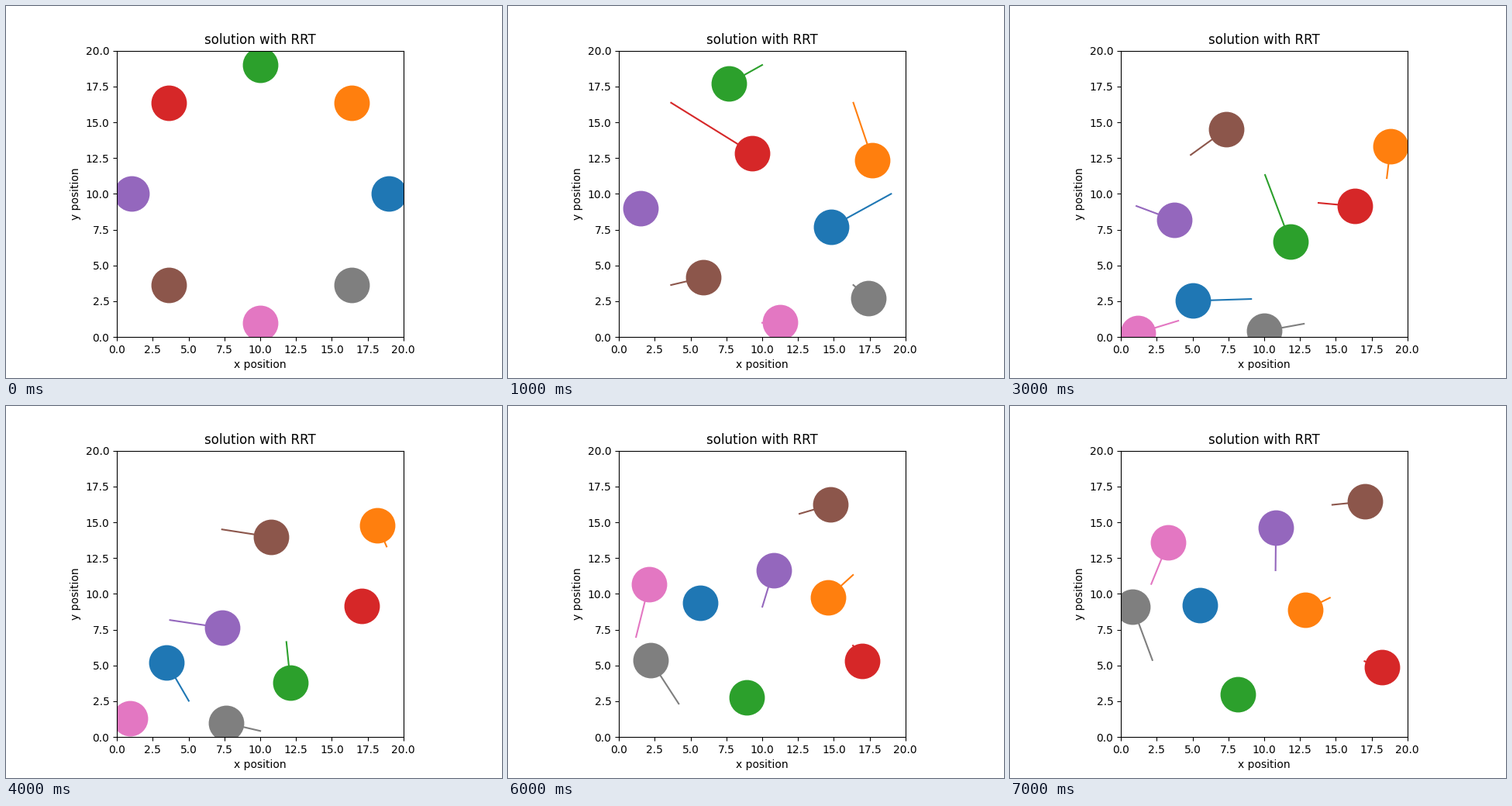
Recreate the animation shown at these times as a matplotlib script. Size 640 by 480 pixels, loop 8000 ms.

```python
import numpy as np
import matplotlib.pyplot as plt
from matplotlib.animation import FuncAnimation

SIZE = 20
ROBOTS = 8
STEPS = 8

# Steps at which the turning points are known; the rest lie on a smooth curve
KEY_STEPS = np.array([0, 1, 2, 4, 5, 7])
TURNS = [
    [(14.83, 7.71), (9.09, 2.66), (3.46, 5.20), (5.30, 8.55), (5.51, 9.20)],
    [(17.71, 12.37), (18.56, 11.10), (18.19, 14.78), (16.34, 11.32), (12.87, 8.88)],
    [(7.69, 17.71), (10.06, 11.32), (12.12, 3.79), (10.06, 2.87), (8.17, 2.97)],
    [(9.29, 12.86), (13.79, 9.37), (17.09, 9.15), (16.34, 6.39), (18.24, 4.87)],
    [(1.50, 9.00), (1.08, 9.15), (7.35, 7.63), (10.01, 9.10), (10.82, 14.62)],
    [(5.91, 4.17), (4.87, 12.72), (10.76, 13.97), (12.60, 15.59), (17.04, 16.45)],
    [(11.25, 1.02), (4.00, 1.14), (0.92, 1.30), (1.19, 6.99), (3.30, 13.59)],
    [(17.40, 2.74), (12.77, 0.93), (7.63, 0.98), (4.17, 2.33), (0.81, 9.10)],
]


def ring_start(i):
    """Robots start evenly spaced on a ring around the centre."""
    angle = 2 * np.pi * i / ROBOTS
    return SIZE / 2 + 9 * np.cos(angle), SIZE / 2 + 9 * np.sin(angle)


def hermite(keys, t):
    """Cubic Hermite curve through the keys, evaluated at step t."""
    slopes = np.gradient(keys, KEY_STEPS, axis=0)
    k = min(np.searchsorted(KEY_STEPS, t, side="right"), len(keys) - 1) - 1
    h = KEY_STEPS[k + 1] - KEY_STEPS[k]
    u = (t - KEY_STEPS[k]) / h
    blend = u * u * (3 - 2 * u)
    return (keys[k] * (1 - blend) + keys[k + 1] * blend
            + h * u * (1 - u) * ((1 - u) * slopes[k] - u * slopes[k + 1]))


def make_path(i):
    keys = np.array([ring_start(i)] + TURNS[i])
    return np.array([hermite(keys, t) for t in range(STEPS)])


paths = [make_path(i) for i in range(ROBOTS)]

fig, ax = plt.subplots(figsize=(6.4, 4.8), dpi=100)
ax.set_aspect("equal")
ax.set_xlim(0, SIZE)
ax.set_ylim(0, SIZE)
ticks = np.arange(0, SIZE + 0.1, 2.5)
ax.set_xticks(ticks)
ax.set_yticks(ticks)
ax.set_title("solution with RRT")
ax.set_xlabel("x position")
ax.set_ylabel("y position")

# Each robot is a trail with a disc on its last point
robots = [ax.plot([], [], color=f"C{i}", marker="o", markersize=32,
                  markevery=[-1])[0] for i in range(ROBOTS)]


def update(step):
    for path, robot in zip(paths, robots):
        robot.set_data(path[max(step - 1, 0):step + 1].T)
    return robots


anim = FuncAnimation(fig, update, frames=STEPS, interval=1000,
                     repeat=True, repeat_delay=0, blit=False)
plt.show()
```
